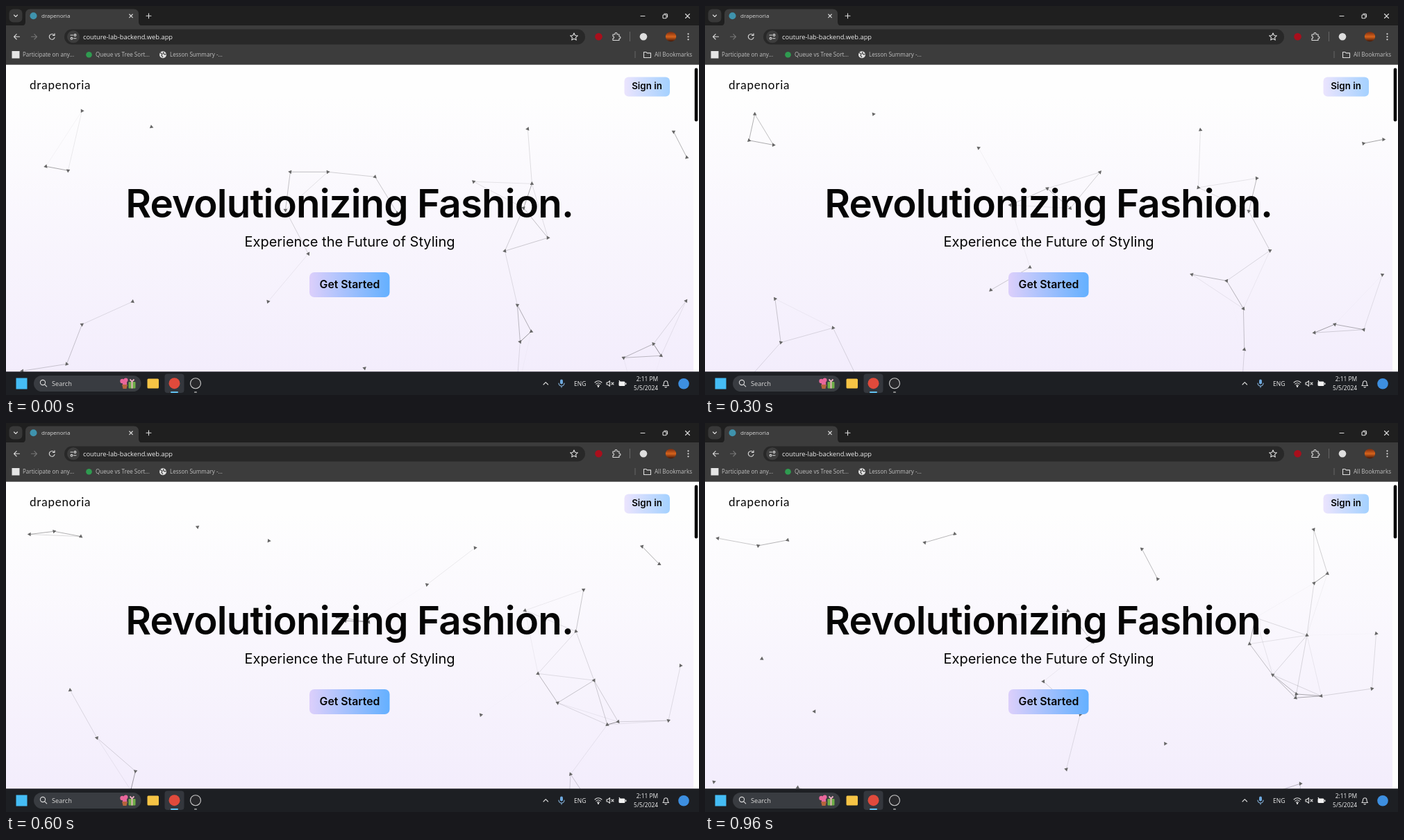
An HTML page with a canvas that plays this animation: 998 by 561 pixels, repeating every 1000 ms.

```html
<!DOCTYPE html>
<html lang="en">
<head>
<meta charset="utf-8">
<title>drapenoria</title>
<style>
  html, body { margin: 0; width: 998px; height: 561px; overflow: hidden; background: #fff; }
  canvas, svg { position: absolute; left: 0; top: 0; width: 998px; height: 561px; display: block; }
  canvas { background: linear-gradient(#fefefe 85px, #fefefe 130px, #f3edfc 527px); }
  .ui { font: 8.1px "Open Sans", "Noto Sans", sans-serif; fill: #d8d8d8; }
  .marks { fill: #bfbfbf; }
  .page { font-family: Inter, "Liberation Sans", sans-serif; fill: #050505; }
  .line { fill: none; stroke: #dcdcdc; stroke-width: 1.1; stroke-linecap: round; stroke-linejoin: round; }
  .dim { stroke: #777; }
  .mic { stroke: #8dbce6; }
</style>
</head>
<body>
<canvas id="net" width="998" height="561"></canvas>
<svg viewBox="0 0 998 561">
  <defs>
    <linearGradient id="start"><stop stop-color="#dccffb"/><stop offset="1" stop-color="#64b0ff"/></linearGradient>
    <linearGradient id="sign"><stop stop-color="#ebe4fd"/><stop offset="1" stop-color="#a4d1ff"/></linearGradient>
    <linearGradient id="dusk" x2="0" y2="1">
      <stop stop-color="#7a2c10"/><stop offset=".5" stop-color="#d8641c"/><stop offset="1" stop-color="#3a1408"/>
    </linearGradient>
  </defs>

  <!-- page -->
  <rect x="990" y="85" width="8" height="442" fill="#fdfdfd"/>
  <rect x="991.7" y="89.5" width="4.6" height="77" rx="2.2" fill="#050505"/>
  <g class="page">
    <text x="34" y="119.5" font-family="Lato, sans-serif" font-size="17" letter-spacing=".8">drapenoria</text>
    <rect x="890.5" y="102.5" width="65.5" height="28" rx="6" fill="url(#sign)"/>
    <text x="923" y="120.3" font-size="13.3" font-weight="600" text-anchor="middle">Sign in</text>
    <text x="494.7" y="304.6" font-size="56.5" font-weight="600" letter-spacing="-.88" text-anchor="middle">Revolutionizing Fashion.</text>
    <text x="495" y="347.3" font-size="20" text-anchor="middle">Experience the Future of Styling</text>
    <rect x="437" y="384" width="115.5" height="36" rx="7" fill="url(#start)"/>
    <text x="495" y="406.6" font-size="15.8" font-weight="600" text-anchor="middle">Get Started</text>
  </g>

  <!-- browser -->
  <g class="ui">
    <rect width="998" height="30" fill="#1f1f1f"/>
    <rect y="28" width="998" height="56.7" fill="#3c3c3c"/>
    <path d="M23 28.5Q28 28 28 23V12Q28 4.5 35 4.5H184Q191 4.5 191 12V23Q191 28 196 28.5Z" fill="#3c3c3c"/>
    <rect x="4.5" y="4.5" width="19" height="19" rx="6" fill="#383838"/>
    <path class="line" d="M11.5 13l2.5 2.5 2.5-2.5M177.7 12l4.6 4.6m0-4.6l-4.6 4.6M202 14.3h7m-3.5-3.5v7"/>
    <circle cx="39.5" cy="14.3" r="5" fill="#3f93ad"/>
    <text x="51" y="17.3" font-size="8">drapenoria</text>
    <g class="line">
      <path d="M914 14.5h6M978.5 11.5l6 6m0-6l-6 6"/>
      <rect x="946" y="12.7" width="5" height="5" rx="1"/>
      <path d="M947.8 11.2h3.2q1.5 0 1.5 1.5v3.2"/>
    </g>

    <path class="line" d="M19.5 44.3h-8m3.7-3.7l-3.7 3.7 3.7 3.7"/>
    <path class="line dim" d="M36.5 44.3h8m-3.7-3.7l3.7 3.7-3.7 3.7"/>
    <path class="line" d="M69.3 42a3.9 3.9 0 1 0 .7 3.3M70 39.7v2.8h-2.8"/>
    <rect x="84" y="33.5" width="750" height="22" rx="11" fill="#282828"/>
    <circle cx="97" cy="44.3" r="9" fill="#3d3d3d"/>
    <g class="line">
      <path d="M93 42h3.5M97.5 46.8h3.5"/>
      <circle cx="99.5" cy="42" r="1.4"/><circle cx="94.5" cy="46.8" r="1.4"/>
    </g>
    <text x="111" y="47.6" font-size="9.3" fill="#ededed">couture-lab-backend.web.app</text>
    <path class="line" d="M818 39l1.6 3.5 3.7.4-2.8 2.5.8 3.7-3.3-1.9-3.3 1.9.8-3.7-2.8-2.5 3.7-.4z"/>
    <circle cx="853.5" cy="44.2" r="5.3" fill="#a80f1c"/>
    <path class="line" d="M874 41h3v-1a1.5 1.5 0 0 1 3 0v1h3v3h.5a1.5 1.5 0 0 1 0 3h-.5v2.5h-9v-2.6a1.6 1.6 0 0 0 0-3.2z"/>
    <path d="M898.5 37v14M906 65v10" stroke="#666"/>
    <circle cx="918" cy="44.3" r="5.3" fill="#dedede"/>
    <ellipse cx="957.5" cy="44.3" rx="7.6" ry="7" fill="url(#dusk)"/>
    <path d="M982.5 40.3v0m0 4v0m0 4v0" stroke="#dcdcdc" stroke-width="2.2" stroke-linecap="round"/>

    <g class="marks">
      <rect x="8.5" y="65" width="11" height="10.5" fill="#e4e4e4"/>
      <text x="24" y="73.2">Participate on any...</text>
      <circle cx="119.5" cy="70.2" r="4.3" fill="#2f9b50"/>
      <text x="129" y="73.2">Queue vs Tree Sort...</text>
      <circle cx="226" cy="70.2" r="5" fill="#e2e2e2"/>
      <path d="M222 67.5l3 1.5-1 2.2 2 2.8M227 66l-.5 2.5 2.5 1.5 1.5-1" fill="none" stroke="#444" stroke-width="1.2"/>
      <text x="236" y="73.2">Lesson Summary -...</text>
      <path class="line" d="M918.5 66.5h3.5l1.2 1.4h5.3v6.6h-10z"/>
      <text x="934" y="73.2">All Bookmarks</text>
    </g>
  </g>

  <!-- taskbar -->
  <g class="ui">
    <rect y="527.3" width="998" height="34" fill="#1d1f23"/>
    <rect x="14.5" y="536.5" width="16" height="16" fill="#45bdf5"/>
    <rect x="40" y="533" width="154.5" height="23" rx="11.5" fill="#393c41"/>
    <g class="line"><circle cx="53" cy="543" r="3.6"/><path d="M55.7 545.8l3 3"/></g>
    <text x="66" y="548" font-size="9.2">Search</text>
    <g fill="#e8679b"><circle cx="167.5" cy="541" r="3.2"/><circle cx="172.5" cy="539.5" r="3"/><circle cx="171" cy="544" r="3.2"/></g>
    <path d="M167 546h8l-1.5 6h-5z" fill="#b5653c"/>
    <rect x="176.5" y="542" width="10" height="9.5" rx="1" fill="#6fae48"/>
    <path d="M181.5 551.5v-10l-3-3m3 3l3-3" fill="none" stroke="#f0b3c4" stroke-width="1.8"/>
    <rect x="203.5" y="537.5" width="16.5" height="14" rx="1.5" fill="#f6c445"/>
    <rect x="228.5" y="530.5" width="28" height="27.5" rx="4" fill="#34373d"/>
    <circle cx="242.5" cy="544.2" r="8" fill="#e04a3c"/>
    <rect x="237" y="556" width="11" height="2" rx="1" fill="#62c3f3"/>
    <circle cx="273" cy="544.2" r="7.5" fill="#28282b" stroke="#c9c9c9" stroke-width="1.1"/>
    <rect x="271" y="556" width="4" height="1.8" rx=".9" fill="#9a9a9a"/>

    <path class="line" d="M774 546l3.3-3.3 3.3 3.3"/>
    <rect x="798" y="538.5" width="4" height="7" rx="2" fill="#6ea9de"/>
    <path class="line mic" d="M796 544a4 4 0 0 0 8 0M800 548v2"/>
    <text x="818" y="547.7" font-size="8.5" fill="#eee">ENG</text>
    <path class="line" d="M848 543q5-4.5 10 0M849.8 545.2q3.2-2.8 6.4 0M851.5 547.2q1.5-1.2 3 0"/>
    <circle cx="853" cy="548.8" r="1.1" fill="#fff"/>
    <path class="line" d="M865 543h1.8l2.7-2.3v7.6l-2.7-2.3H865zM872 543l3 3m0-3l-3 3"/>
    <rect x="882.5" y="541.5" width="9" height="6.5" rx="1.5" fill="#f2f2f2"/>
    <path d="M892.7 543.5v2.5M883 540l1.5 3" stroke="#f2f2f2" stroke-width="1.3"/>
    <g font-size="8.4" fill="#f2f2f2" text-anchor="end">
      <text x="939" y="541.3">2:11 PM</text>
      <text x="939" y="554">5/5/2024</text>
    </g>
    <path class="line" d="M946 547.5q1.5-1.5 1.5-4a2.7 2.7 0 0 1 5.4 0q0 2.5 1.5 4zM949 549.5q1.2 1 2.4 0"/>
    <circle cx="976" cy="544.7" r="7.8" fill="#3d8fe0"/>
  </g>
</svg>
<script>
  const ctx = document.getElementById("net").getContext("2d");
  const SPEED = 4.22, SIZE = 3.2, REACH = 104;
  const LEFT = SIZE, RIGHT = 990.6 - SIZE, TOP = 140.5 + SIZE;
  const rad = deg => deg * Math.PI / 180;

  // start x, start y, heading in degrees; all drift at one speed
  const dots = [
    [109, 151, 173], [57, 231, -81], [89, 237, -76], [209, 174, -29],
    [409, 239, -114], [463, 239, 39], [531, 246, -10], [402, 294, -11],
    [563, 298, -170], [435, 357, 31], [377, 426, -26], [182, 426, 87],
    [109, 459, -103], [87, 516, -55], [23, 526, 28], [255, 536, -175],
    [42, 636, -104], [516, 522, 158], [608, 584, -136], [751, 177, 178],
    [673, 253, 13], [757, 256, -12], [745, 291, 7], [780, 334, 29],
    [718, 353, 117], [736, 431, -67], [756, 469, -60], [740, 484, 17],
    [734, 565, 10], [913, 599, -149], [961, 181, 17], [980, 218, -148],
    [979, 425, -96], [932, 487, -132], [943, 504, -82], [889, 507, -108]
  ];

  const bounceLow = (v, edge) => edge + Math.abs(v - edge);
  const bounceHigh = (v, edge) => edge - Math.abs(v - edge);

  function place([x, y, heading], i, tick) {
    const far = SPEED * tick, spin = i % 2 ? 10 : -10;
    return {
      x: bounceHigh(bounceLow(x + .4 + far * Math.cos(rad(heading)), LEFT), RIGHT),
      y: bounceLow(y + .3 + far * Math.sin(rad(heading)), TOP),
      turn: rad(i * 47 + spin * tick)
    };
  }

  function link(a, b) {
    const d = Math.hypot(a.x - b.x, a.y - b.y);
    if (d >= REACH) return;
    ctx.strokeStyle = `rgba(0,0,0,${.62 * (1 - d / REACH)})`;
    ctx.beginPath();
    ctx.moveTo(a.x, a.y);
    ctx.lineTo(b.x, b.y);
    ctx.stroke();
  }

  function triangle({ x, y, turn }) {
    ctx.beginPath();
    for (let k = 0; k < 3; k++) {
      const a = turn + rad(120 * k);
      ctx.lineTo(x + SIZE * Math.cos(a), y + SIZE * Math.sin(a));
    }
    ctx.fill();
  }

  function draw(tick) {
    const pts = dots.map((d, i) => place(d, i, tick));
    ctx.clearRect(0, 0, 998, 561);
    ctx.lineWidth = .8;
    pts.forEach((a, i) => pts.slice(i + 1).forEach(b => link(a, b)));
    ctx.fillStyle = "#666";
    pts.forEach(triangle);
  }

  // three ticks per 100 ms, lasting 30, 30 and 40 ms
  const tickAt = ms => Math.floor(ms / 100) * 3 + Math.min(2, Math.floor(ms % 100 / 30));

  const t0 = performance.now();
  function loop() {
    draw(tickAt((performance.now() - t0) % 1000));
    requestAnimationFrame(loop);
  }
  loop();
</script>
</body>
</html>
```
